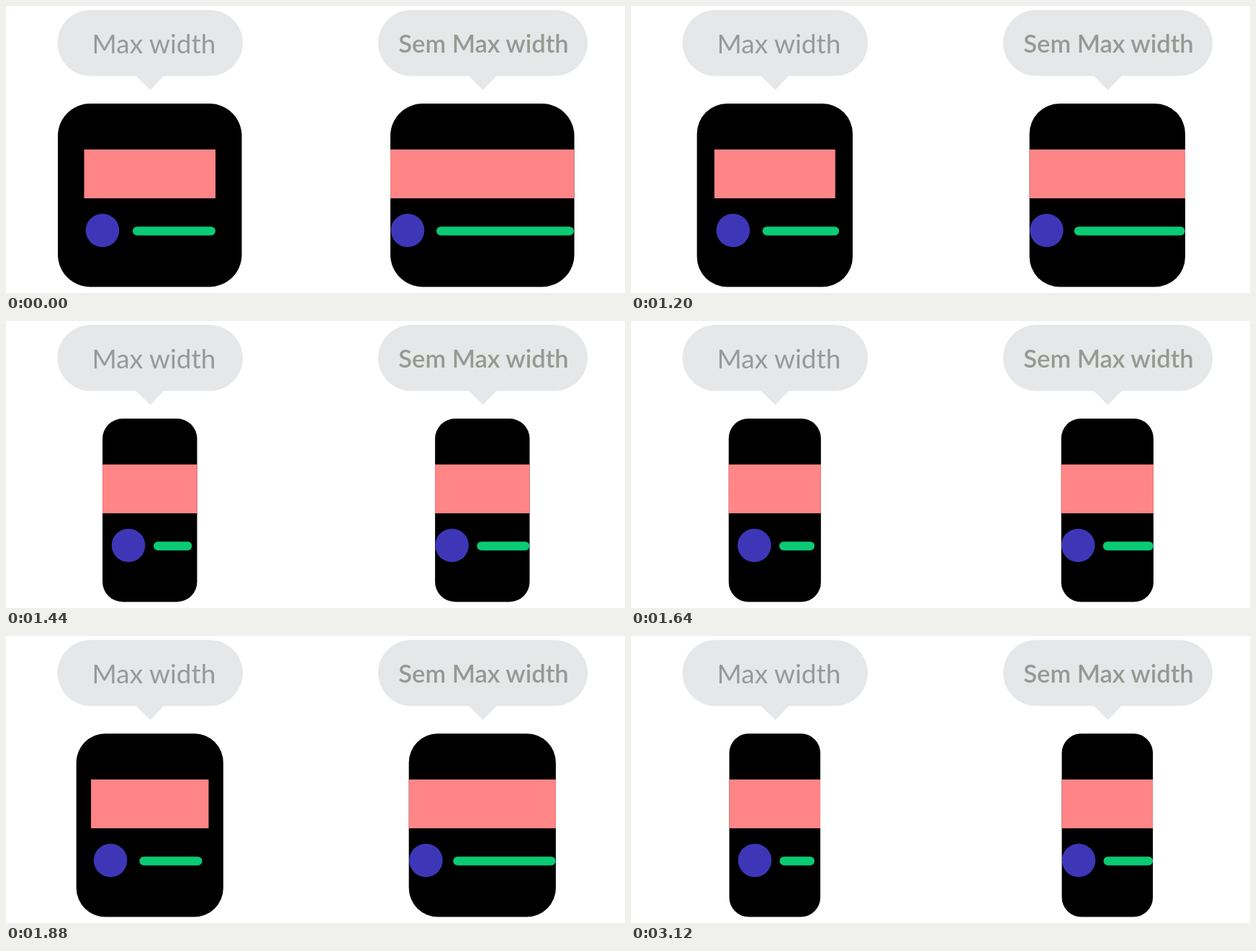
An HTML page for the animation above (5040 ms loop, 860 by 400 pixels).

```html
<!DOCTYPE html>
<html lang="pt">
<head>
<meta charset="utf-8">
<title>Max width</title>
<style>
  html, body { margin: 0; width: 100%; height: 100%; overflow: hidden; background: #fff; }
  svg { display: block; width: 860px; height: 400px; }
  text { font-family: Lato, "Open Sans", sans-serif; text-anchor: middle; }
  .bubble { fill: #e6e7e9; }
  .pink { fill: #ff8587; }
  .blue { fill: #3d37b8; }
  .green { fill: #0bca74; }
</style>
</head>
<body>
<svg viewBox="0 0 860 400">
  <g class="bubble">
    <rect x="71.5" y="5.5" width="257.5" height="92" rx="46"/>
    <path d="M180 97h39.500L200.500 117z"/>
    <rect x="517" y="5.500" width="291" height="92" rx="46"/>
    <path d="M642.500 97h39.500L662.500 117z"/>
  </g>
  <text x="205.500" y="66" font-size="37" fill="#97999b">Max width</text>
  <text x="663.500" y="65" font-size="34.500" font-weight="600" fill="#949b92">Sem Max width</text>
  <g id="limited"></g>
  <g id="full"></g>
</svg>
<script>
const LOOP = 5040, STEP = 40, EASE_TIME = 500;
const SHRINK_START = 1009, GROW_START = 1600;

const lerp = (from, to, k) => from + (to - from) * k;

// CSS ease-in-out: cubic-bezier(.42, 0, .58, 1)
function easeInOut(x) {
  if (x <= 0) return 0;
  if (x >= 1) return 1;
  let low = 0, high = 1, s = 0.5;
  for (let i = 0; i < 24; i++) {
    s = (low + high) / 2;
    const bx = 1.26 * s * (1 - s) ** 2 + 1.74 * s * s * (1 - s) + s ** 3;
    if (bx < x) low = s; else high = s;
  }
  return s * s * (3 - 2 * s);
}

// 0 is the wide device, 1 the narrow one
function narrowness(t) {
  if (t < 1040) return 0;
  if (t >= 3120) return 1;
  if (t >= 2080) return 0;
  return t < GROW_START
    ? easeInOut((t - SHRINK_START) / EASE_TIME)
    : 1 - easeInOut((t - GROW_START) / EASE_TIME);
}

function createDevice(id) {
  const group = document.getElementById(id);
  const add = (name, attrs) => {
    const node = document.createElementNS("http://www.w3.org/2000/svg", name);
    group.append(node);
    set(node, attrs);
    return node;
  };
  return {
    body: add("rect", { y: 136, height: 255.5 }),
    banner: add("rect", { y: 200, height: 68, class: "pink" }),
    avatar: add("circle", { cy: 312.7, r: 23.3, class: "blue" }),
    line: add("rect", { y: 307.4, height: 12.3, rx: 6.15, class: "green" })
  };
}

function set(node, attrs) {
  for (const key in attrs) node.setAttribute(key, attrs[key]);
}

const span = (left, right) => ({ x: left, width: right - left });
const centered = (center, width) => span(center - width / 2, center + width / 2);

function drawDevice(device, center, p, bannerWidth, avatarX, lineLeft, lineRight) {
  const bodyWidth = lerp(255.5, 126.5, p);
  set(device.body, { ...centered(center, bodyWidth), rx: lerp(45, 27, p ** 1.5) });
  set(device.banner, centered(center, Math.min(bannerWidth, bodyWidth)));
  set(device.avatar, { cx: avatarX });
  set(device.line, span(lineLeft, lineRight));
}

const limited = createDevice("limited");
const full = createDevice("full");

function draw(t) {
  const p = narrowness(t);
  const shrinking = t < GROW_START;
  // The row inside the limited device lags behind the device edge
  const lag = p ** 1.33;
  const endLag = shrinking ? p ** 2.5 : 1 - (1 - p) ** 1.42;
  drawDevice(limited, 199.8, p, lerp(182.5, 134.5, p),
    lerp(134, 172, lag), lerp(176, 206.5, p ** 1.28), lerp(291, 255, endLag));
  drawDevice(full, 661.8, p, Infinity,
    lerp(558, 622, p), lerp(598, 656.5, p), lerp(789, 725, p));
}

function tick() {
  const t = performance.now() % LOOP;
  draw(Math.floor(t / STEP) * STEP);
  requestAnimationFrame(tick);
}
tick();
</script>
</body>
</html>
```
